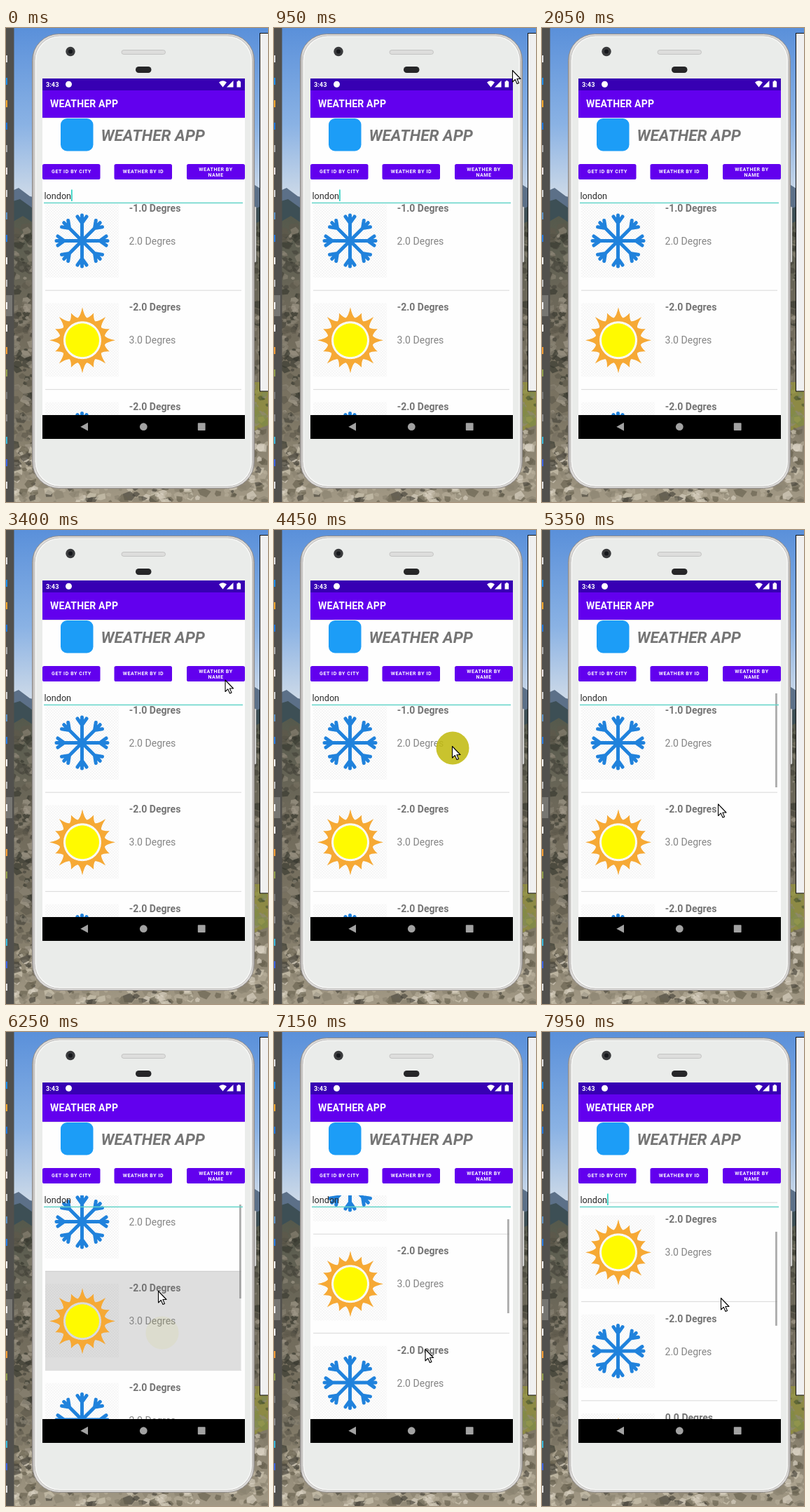
These frames come from a looping animation (374x676 px, 8 s). An HTML page:

```html
<!DOCTYPE html>
<html lang="en">
<head>
<meta charset="utf-8">
<title>Weather app</title>
<style>
  html, body { margin: 0; width: 100%; height: 100%; overflow: hidden; }
  svg { display: block; width: 374px; height: 676px; font-family: Roboto, sans-serif; }
  .btn rect { fill: #6200ee; }
  .btn text { fill: #fff; font-size: 7.03px; font-weight: 700; letter-spacing: .58px; text-anchor: middle; }
  .temp { font-size: 14.06px; fill: #858585; }
  .temp.max { font-weight: 700; fill: #757575; }
</style>
</head>
<body>
<svg viewBox="0 0 374 676" xmlns="http://www.w3.org/2000/svg">
  <defs>
    <linearGradient id="sky" x2="0" y2="1">
      <stop offset="0" stop-color="#5a90da"/>
      <stop offset=".55" stop-color="#8ab2e4"/>
      <stop offset="1" stop-color="#d3dde8"/>
    </linearGradient>
    <linearGradient id="ground" x2="0" y2="1">
      <stop offset="0" stop-color="#55594c"/>
      <stop offset=".35" stop-color="#706a5b"/>
      <stop offset=".7" stop-color="#7b7462"/>
      <stop offset="1" stop-color="#a39a86"/>
    </linearGradient>
    <linearGradient id="rim" x2="1" y2="0">
      <stop offset="0" stop-color="#a9a5a3"/>
      <stop offset=".012" stop-color="#dedcda"/>
      <stop offset=".988" stop-color="#dedcda"/>
      <stop offset="1" stop-color="#a9a5a3"/>
    </linearGradient>
    <pattern id="check" width="4" height="4" patternUnits="userSpaceOnUse">
      <path d="M0 0h2v2h-2zM2 2h2v2h-2z" fill="#000" fill-opacity=".035"/>
    </pattern>
    <clipPath id="view"><rect x="52" y="233" width="289" height="319"/></clipPath>
    <g id="snow" fill="none" stroke="#2082dc" stroke-width="5" stroke-linecap="round" stroke-linejoin="round"></g>
    <g id="sun">
      <path id="rays" fill="#f6a935" fill-rule="evenodd"/>
      <circle r="24" fill="#fffa00"/>
    </g>
  </defs>

  <!-- landscape -->
  <rect width="374" height="250" fill="url(#sky)"/>
  <path d="M0 236L18 228L34 240L60 246H340L352 222L374 236V300H0Z" fill="#5c7088"/>
  <path d="M0 250L20 244L45 262H345L374 250V300H0Z" fill="#3d4f55"/>
  <path d="M0 282L24 268L48 284H345L374 270V676H0Z" fill="url(#ground)"/>
  <path d="M345 505H374V566L345 578Z" fill="#8d8a45"/>
  <g id="rocks"></g>

  <!-- task bar -->
  <rect width="11.5" height="676" fill="#51504d"/>
  <rect y="381" width="9" height="30" fill="#777672"/>
  <g id="dock"></g>

  <!-- phone -->
  <rect x="354" y="255" width="3" height="79" rx="1.2" fill="#dcdcda" stroke="#999" stroke-width=".5"/>
  <rect x="37.5" y="8.5" width="317" height="648" rx="38" fill="url(#rim)" stroke="#8f8b89"/>
  <rect x="41" y="11" width="310.5" height="643" rx="35.5" fill="#eaecea" stroke="#c4c2c0" stroke-width="1"/>
  <rect x="42.5" y="12.5" width="307.5" height="640" rx="34" fill="none" stroke="#f8f8f7" stroke-width="1.2"/>
  <circle cx="92" cy="33.5" r="6.7" fill="#3a3b3d"/>
  <circle cx="92" cy="33.5" r="3" fill="#16181c"/>
  <rect x="165" y="31.5" width="62.5" height="6" rx="3" fill="#dddddc" stroke="#bdbdbb" stroke-width=".8"/>
  <rect x="185" y="55" width="22.5" height="9" rx="4.5" fill="#262628"/>

  <!-- screen -->
  <rect x="52" y="72" width="289" height="514" fill="#fefefe"/>
  <rect x="52" y="128" width="289" height="1" fill="#000" opacity=".08"/>
  <rect x="52" y="72" width="289" height="17" fill="#3700b3"/>
  <rect x="52" y="89" width="289" height="39" fill="#6200ee"/>
  <g fill="#fff">
    <text x="57" y="83.5" font-size="9.2" font-weight="700">3:43</text>
    <circle cx="89.5" cy="80.2" r="4.5"/>
    <path d="M304 77.6Q309.5 73 315 77.6L309.5 84.5ZM324.5 75V84.5H315Z"/>
    <path d="M329.5 76.2H331V75H333.6V76.2H335.1V84.5H329.5Z"/>
    <text x="63" y="113.2" font-size="14.06" font-weight="700" letter-spacing=".16">WEATHER APP</text>
  </g>
  <rect x="78" y="129" width="46.5" height="46.5" rx="9" fill="#1c9df7"/>
  <text x="135.5" y="160.8" font-size="22.5" font-weight="700" font-style="italic" fill="#757575">WEATHER APP</text>
  <g class="btn">
    <rect x="52" y="194" width="82.5" height="22" rx="2.6"/>
    <rect x="154.5" y="194" width="82.5" height="22" rx="2.6"/>
    <rect x="258" y="194" width="83" height="22" rx="2.6"/>
    <text x="93.5" y="207.4">GET ID BY CITY</text>
    <text x="196" y="207.4">WEATHER BY ID</text>
    <text x="299.5" y="203.6">WEATHER BY</text>
    <text x="299.5" y="212">NAME</text>
  </g>
  <g clip-path="url(#view)">
    <g id="list"></g>
    <rect id="bar" x="333" y="233" width="2.8" height="134" fill="#8a8a8a" opacity="0"/>
  </g>
  <text x="54.5" y="243.5" font-size="12.65" fill="#2c2c2c">london</text>
  <rect x="54" y="248.7" width="284" height="1.5" fill="#62d3c8"/>
  <rect id="caret" x="93.2" y="230.5" width="1.4" height="16.5" fill="#03c9b6"/>
  <rect x="52" y="552" width="289" height="34" fill="#000"/>
  <g fill="#a2a2a2">
    <path d="M117 562.8V574.6L106.3 568.7Z"/>
    <circle cx="196.3" cy="568.7" r="5.4"/>
    <rect x="273.8" y="563.3" width="10.8" height="10.8" rx=".8"/>
  </g>

  <!-- pointer -->
  <circle id="tap" r="23.5" fill="#c2bb12" opacity="0"/>
  <path id="mouse" d="M.5 .5V17L4.3 13.4L7 19.5L9.5 18.4L6.9 12.5H12Z" fill="#fff" stroke="#000" stroke-width="1.1" stroke-linejoin="round"/>

  <rect x="362.5" y="7.5" width="14" height="510.5" fill="#f0f0f0" stroke="#111"/>
</svg>
<script>
const NS = 'http://www.w3.org/2000/svg';
const $ = id => document.getElementById(id);

function add(parent, tag, attrs, text) {
  const el = document.createElementNS(NS, tag);
  for (const k in attrs) el.setAttribute(k, attrs[k]);
  if (text) el.textContent = text;
  parent.append(el);
  return el;
}

// Rocks and grass: seeded facets along the visible rim
let seed = 7;
const rnd = () => (seed = seed * 16807 % 2147483647) / 2147483647;
const shadow = ['#8a8474', '#45443a', '#767061', '#35372e', '#a19a8a', '#5d594b'];
const bright = ['#cfc7b4', '#47443a', '#b5ac98', '#8b8370', '#dad3c3', '#67614f'];
const grass = ['#7f8a48', '#4a5630', '#98994f', '#8f8b78'];

function facet(x, y, tones) {
  const n = 5, turn = rnd() * 6, r = 3 + rnd() * 8, pts = [];
  for (let i = 0; i < n; i++) {
    const a = turn + i / n * Math.PI * 2, d = r * (.5 + rnd() * .6);
    pts.push((x + d * Math.cos(a)).toFixed(1), (y + d * .8 * Math.sin(a)).toFixed(1));
  }
  add($('rocks'), 'polygon', { points: pts.join(' '), fill: tones[rnd() * tones.length | 0], opacity: .65 });
}
for (let i = 0; i < 230; i++) {
  const y = 285 + rnd() * 388;
  facet(8 + rnd() * 36, y, y > 600 ? bright : shadow);
}
for (let i = 0; i < 130; i++) {
  const y = 285 + rnd() * 388;
  facet(350 + rnd() * 24, y, y < 510 ? shadow : y < 570 ? grass : bright);
}
for (let i = 0; i < 110; i++) facet(12 + rnd() * 362, 650 + rnd() * 26, bright);

// Clipped icons in the task bar
const dock = ['#ddd', '#1b8be8', '#eea32c', '#1d74d8', '#aaa', '#e6dede', '#ccc', '#5d8fc0', '#2678de', '#eee',
  '#bbb', '#eee', '#fff', '#ef9a35', '#8e9b4c', '#777', '#888', '#38b4d8', '#3a62e0', '#ddd'];
dock.forEach((fill, i) => add($('dock'), 'rect', { y: 39 + i * 32, width: 2, height: 10, fill }));

for (let i = 0; i < 8; i++)
  add($('snow'), 'path', { d: 'M0 0V-36.5M-6.5 -34.5L0 -25.5L6.5 -34.5', transform: `rotate(${i * 45})` });

// Sixteen flared rays around a ring
const polar = (r, a) => `${(r * Math.sin(a)).toFixed(2)} ${(-r * Math.cos(a)).toFixed(2)}`;
const step = Math.PI / 16;
let star = 'M' + polar(32.5, -step);
for (let i = 0; i < 16; i++) {
  const a = i * 2 * step;
  star += `Q${polar(34.5, a - step * .4)} ${polar(i % 2 ? 42 : 47, a)}Q${polar(34.5, a + step * .4)} ${polar(32.5, a + step)}`;
}
$('rays').setAttribute('d', star + 'ZM-27 0a27 27 0 1 0 54 0a27 27 0 1 0 -54 0Z');

// Forecast rows
const PITCH = 141.3;
const rows = [['snow', '-1.0', '2.0'], ['sun', '-2.0', '3.0'], ['snow', '-2.0', '2.0'], ['sun', '0.0', '3.0']];
const glow = rows.map(([icon, max, min], i) => {
  const g = add($('list'), 'g', { transform: `translate(0 ${233 + i * PITCH})` });
  const lit = add(g, 'rect', { x: 56, width: 279.5, height: 141.3, fill: '#000', opacity: 0 });
  add(g, 'rect', { x: 56, y: 18, width: 105, height: 105, fill: 'url(#check)' });
  add(g, 'use', { href: '#' + icon, x: icon === 'sun' ? 109 : 108.5, y: icon === 'sun' ? 71 : 70.5 });
  add(g, 'text', { x: 175.7, y: 29.2, class: 'temp max' }, max + ' Degres');
  add(g, 'text', { x: 175.5, y: 76, class: 'temp' }, min + ' Degres');
  add(g, 'rect', { x: 56, y: 140.6, width: 280, height: 1.2, fill: '#dedede' });
  return lit;
});

// Motion tables: [ms, values...]
const pointer = [
  [700, 366, 120], [950, 340, 60], [1150, 330, 21], [1350, 345, 80], [1550, 366, 130],
  [2800, 366, 130], [2850, 326, 179], [3000, 318, 196], [3100, 318, 196], [3250, 350, 134],
  [3450, 300, 240], [3700, 262, 366], [3950, 256, 330], [4300, 254, 308], [4500, 254, 308],
  [4800, 252, 366], [5000, 252, 380], [5350, 251, 390.5], [5650, 222, 419], [5700, 222, 419],
  [5800, 222, 426], [5950, 222, 426], [6250, 217, 369], [6600, 214, 316], [6900, 214, 316],
  [7150, 215.5, 452], [7200, 216, 452], [7550, 235, 384], [7750, 255, 378], [7900, 255, 378], [7950, 255, 379]
];
const scroll = [[6100, 0], [6250, 33], [6450, 70], [6600, 86], [7250, 86], [7450, 114], [7600, 127], [7750, 131]];
const barFade = [[4850, 0], [4900, 1], [5400, 1], [5650, 0], [6150, 0], [6200, 1]];
const taps = [[4400, 255, 311], [5950, 223, 429], [7200, 217, 455]];
const pressed = [[0, 4550, 4900], [1, 6050, 6300]];

function at(table, t) {
  const i = table.findIndex(k => k[0] > t);
  if (i === 0) return table[0].slice(1);
  if (i < 0) return table[table.length - 1].slice(1);
  const a = table[i - 1], b = table[i], p = (t - a[0]) / (b[0] - a[0]);
  return a.slice(1).map((v, j) => v + (b[j + 1] - v) * p);
}

function draw(t) {
  const [x, y] = at(pointer, t), [s] = at(scroll, t), beat = t % 1000;
  $('mouse').setAttribute('transform', `translate(${x} ${y})`);
  $('list').setAttribute('transform', `translate(0 ${-s})`);
  $('bar').setAttribute('y', 233 + s * .396);
  $('bar').setAttribute('opacity', at(barFade, t)[0] * .7);
  $('caret').setAttribute('opacity', beat < 50 || beat >= 550 ? 1 : 0);

  const tap = taps.find(k => t >= k[0] && t < k[0] + 320);
  $('tap').setAttribute('opacity', tap ? .88 * Math.min(1, (tap[0] + 320 - t) / 220) : 0);
  if (tap) {
    $('tap').setAttribute('cx', tap[1]);
    $('tap').setAttribute('cy', tap[2]);
  }
  for (const [row, from, to] of pressed)
    glow[row].setAttribute('opacity', t >= from && t < to ? .125 : 0);
}

const start = performance.now();
function tick() {
  const t = Math.max(0, performance.now() - start) % 8000;
  draw(Math.floor(t / 50) * 50);
  requestAnimationFrame(tick);
}
tick();
</script>
</body>
</html>
```
